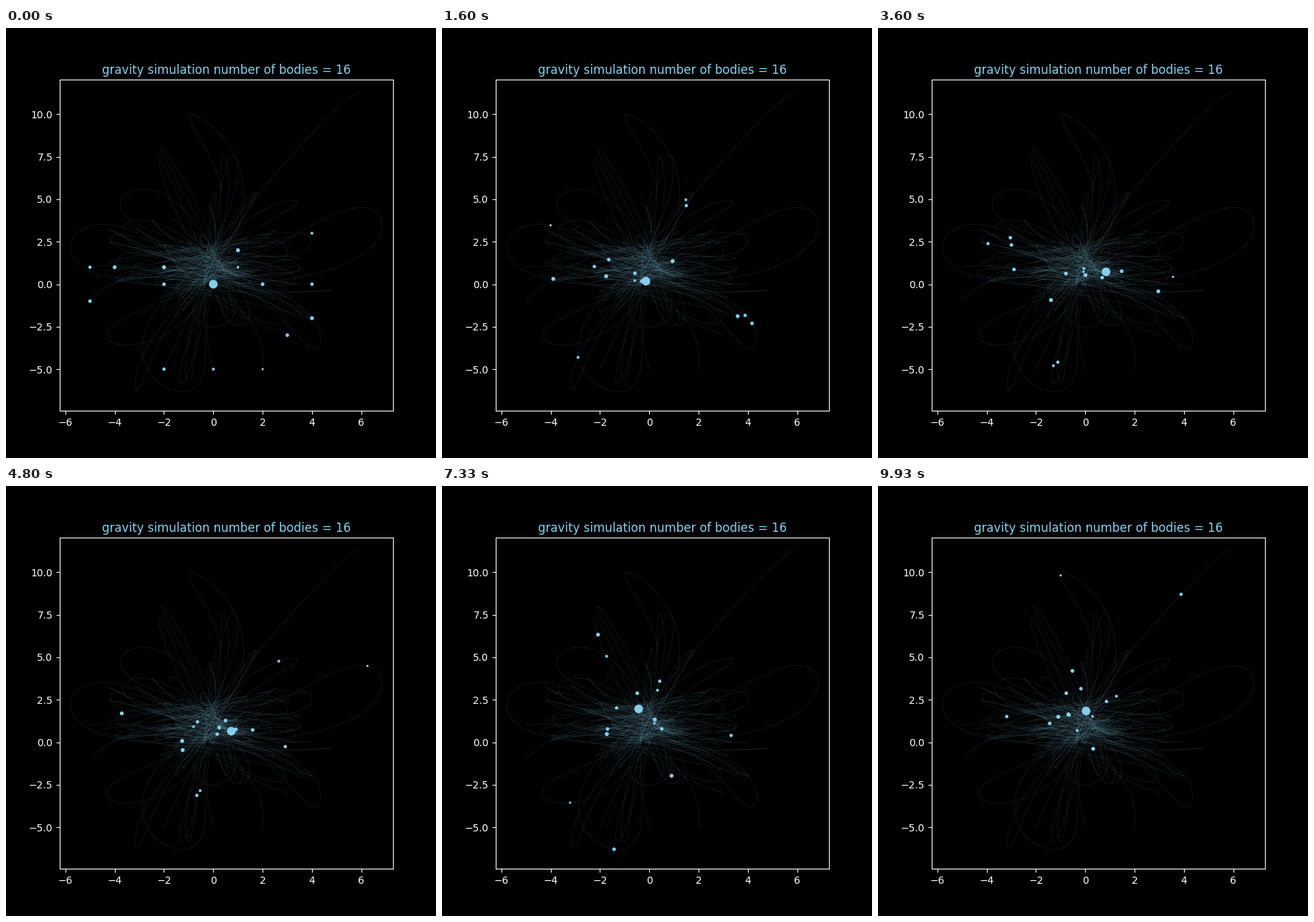
Animation of 600x600 px, one loop 9.99 s. Source, as a matplotlib script:

```python
import numpy as np
import matplotlib.pyplot as plt
from matplotlib.animation import FuncAnimation

FRAMES, FPS = 150, 15
TRAIL_END = 10.8      # seconds of path shown by the trails
PACE = 0.36           # seconds per unit of reach for one swing
DRIFT = 0.2j          # upward drift of the whole system per second
SKY = "skyblue"

rng = np.random.default_rng(16)


def ease_through(times, points, t):
    """Smooth curve through a few points, at rest at the start."""
    slope = np.gradient(points, times)
    slope[0] = 0
    i = np.clip(np.searchsorted(times, t, "right") - 1, 0, len(times) - 2)
    span = times[i + 1] - times[i]
    u = (t - times[i]) / span
    return ((1 + 2 * u) * (1 - u) ** 2 * points[i]
            + u * u * (3 - 2 * u) * points[i + 1]
            + u * (1 - u) * span * ((1 - u) * slope[i] - u * slope[i + 1]))


def next_tip(tip):
    """Far side of the centre, turned a little, with a new reach."""
    reach = np.clip(abs(tip) * rng.uniform(0.8, 1.25), 1.6, 4)
    swing = -tip / abs(tip) * np.exp(1j * rng.uniform(-0.5, 0.5))
    return reach * complex(swing.real, 0.8 * swing.imag)


class Orbit:
    """Swings from rest through the centre, out to one tip after another."""

    def __init__(self, radius, start, *tips):
        self.radius = radius
        self.offset = complex(*rng.normal(0, 0.35, 2))
        rel = [start - self.hub(0)]
        begins = [-PACE * abs(rel[0]) / 2]
        tips = list(tips)
        while begins[-1] < TRAIL_END + 1:
            length = PACE * abs(rel[-1])
            begins.append(begins[-1] + length)
            if tips:
                rel.append(tips.pop(0) - self.hub(begins[-1] + length / 2))
            else:
                rel.append(next_tip(rel[-1]))
        self.rel, self.begins = np.array(rel), np.array(begins)
        # sideways bend at each pass that keeps the velocity continuous
        turn = np.angle(-self.rel[1:] / self.rel[:-1])
        bend = -np.tan(np.clip(turn, -1.1, 1.1) / 2) / 2
        self.bend = np.concatenate([[-bend[0]], bend, [0]])

    def hub(self, t):
        return self.offset + DRIFT * t

    def path(self, t):
        i = np.searchsorted(self.begins, t, "right") - 1
        rel = self.rel[i]
        u = (t - self.begins[i]) / (PACE * abs(rel))
        bend = self.bend[i] * (1 - u) + self.bend[i + 1] * u
        swing = np.sin(np.pi * u) + 1j * bend * np.sin(2 * np.pi * u)
        return self.hub(t) + rel * swing


class Sun:
    radius = 6
    times = np.array([0, 1.6, 3.6, 6, 7.33, 8.93, 9.93, TRAIL_END])
    points = np.array([0, -0.14 + 0.18j, 0.84 + 0.73j, 0.27 + 0.81j,
                       -0.43 + 1.96j, -0.37 + 2.9j, 0.03 + 1.84j, 0.3 + 1.5j])

    def path(self, t):
        return ease_through(self.times, self.points, t)


bodies = [
    Sun(),
    Orbit(2.3, -5 + 1j, 4 - 2j, -4.2 + 2.5j),
    Orbit(2.7, -4 + 1j, 3.6 - 2j, -3.9 + 0.4j, 3.2 + 0.8j, -3.6 + 3.4j,
          1.2 - 2.4j, -2.1 + 7.9j),
    Orbit(2.8, -2 + 1j),
    Orbit(2.5, -2),
    Orbit(2.8, 1 + 2j),
    Orbit(1.8, 1 + 1j),
    Orbit(2.6, 2),
    Orbit(2, 4 + 3j, -3.1 - 6.3j, 3.4 + 5j, -2.5j, -3.5 + 5.3j, 4 + 2.6j),
    Orbit(2.4, 4, -3.2 + 1.2j, 3.2 - 0.8j, -4.2 + 3.2j),
    Orbit(2.7, 4 - 2j, -4 + 0.4j, 4.8 - 0.4j, -3.9 + 1.5j, 1 - 2.4j,
          -2.2 + 7.2j),
    Orbit(2.5, 3 - 3j, -2 + 2.4j, 2.9 - 2.2j),
    Orbit(2.5, -5 - 1j, 4.2 - 3.8j, -4.2 + 2.8j, 3 + 2j, -1.3 - 6.5j),
    Orbit(2.3, -2 - 5j, 1.7 + 5.4j, -1 - 5.9j, 0.8 + 7.6j, -2 - 1.5j,
          6 + 11.1j),
    Orbit(2, -5j, 1.8 + 5.4j, -1.3 - 5.9j, 0.4 + 7.5j),
    Orbit(1.6, 2 - 5j, -5.6 + 2.8j, 6.7 + 4.1j, -4.2 - 3.3j, -0.9 + 9.9j),
]

plt.style.use("dark_background")
fig, ax = plt.subplots(figsize=(6, 6), dpi=100, facecolor="black")
ax.set_xlim(-6.225, 7.285)
ax.set_ylim(-7.447, 12.046)
ax.set_title(f"gravity simulation number of bodies = {len(bodies)}", color=SKY)

trail_times = np.linspace(0, TRAIL_END, 1000)
for body in bodies:
    trail = body.path(trail_times)
    ax.plot(trail.real, trail.imag, ":", lw=0.7, color=SKY, alpha=0.25, zorder=1)

sizes = [(2 * body.radius * 72 / fig.dpi) ** 2 for body in bodies]
dots = ax.scatter(np.zeros(len(bodies)), np.zeros(len(bodies)), s=sizes,
                  color=SKY, linewidths=0, zorder=3)


def update(i):
    spots = np.array([body.path(i / FPS) for body in bodies])
    dots.set_offsets(np.column_stack([spots.real, spots.imag]))
    return (dots,)


update(0)
anim = FuncAnimation(fig, update, frames=FRAMES, interval=66.6,
                     repeat=True, repeat_delay=0)
plt.show()
```
